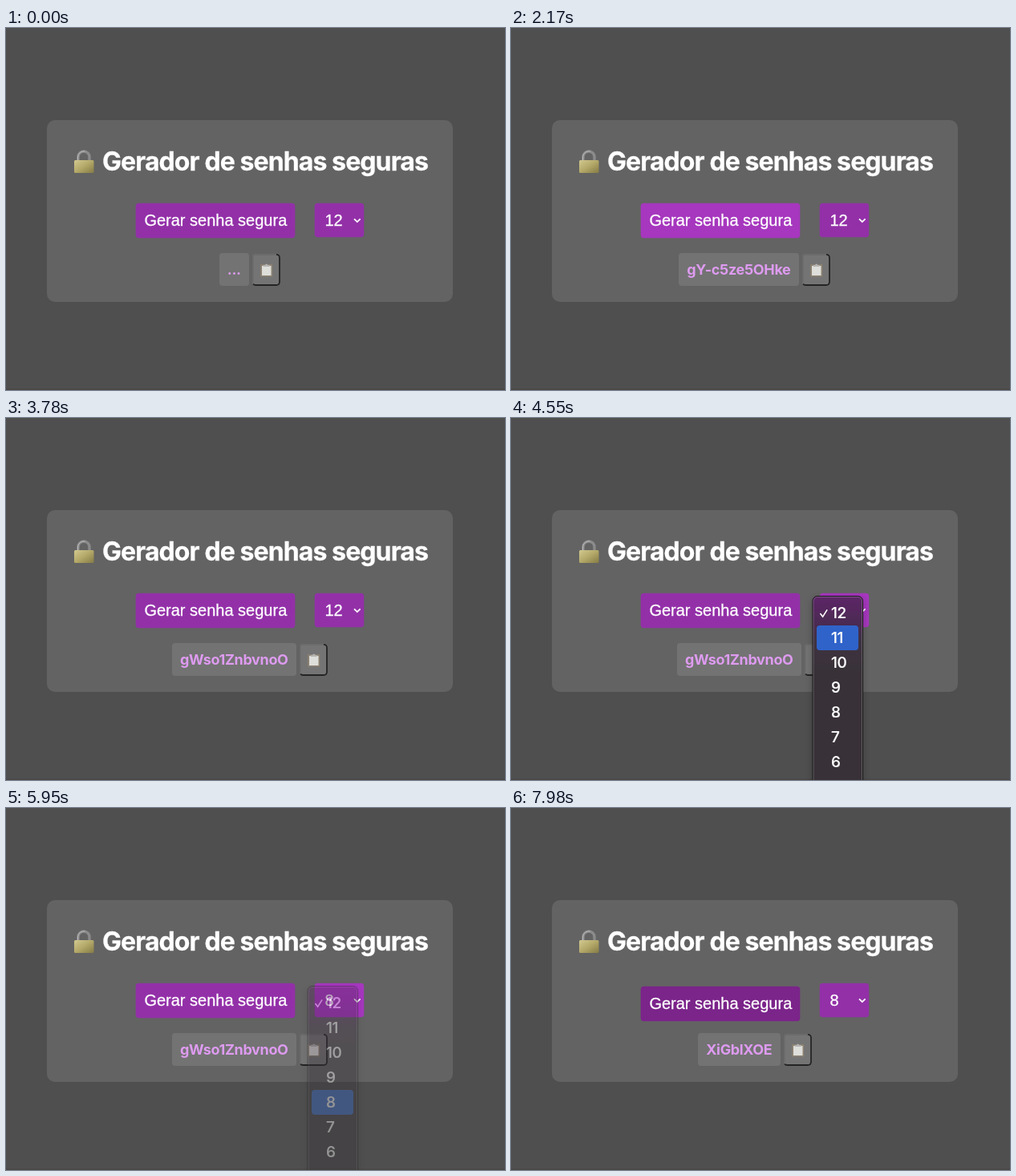
These frames come from a looping animation (622 px wide and 452 px high, 8 s). An HTML page:

```html
<!DOCTYPE html>
<html lang="pt-BR">
<head>
<meta charset="utf-8">
<title>Gerador de senhas</title>
<style>
  html, body { margin: 0; width: 100%; height: 100%; overflow: hidden; background: #4f4f4f; }
  svg { display: block; }
  text { fill: #fff; white-space: pre; }
  .control { font: 20px "Liberation Sans", Arial, sans-serif; stroke: #fff; stroke-width: .3px; }
  .title { font: 700 32px Inter, sans-serif; letter-spacing: -.9px; text-anchor: middle; stroke: #fff; stroke-width: .3px; }
  #password { font: 700 18px Inter, sans-serif; letter-spacing: -.35px; fill: #de9bf0; text-anchor: middle; }
  #rows text { font: 500 19px Inter, sans-serif; letter-spacing: -.3px; stroke: #fff; stroke-width: .2px; }
</style>
</head>
<body>
<svg width="622" height="452" viewBox="0 0 622 452">
  <defs>
    <linearGradient id="brass" x2="1" y2="1">
      <stop stop-color="#d2c990"/><stop offset=".5" stop-color="#b3a868"/><stop offset="1" stop-color="#857b45"/>
    </linearGradient>
    <linearGradient id="glass" gradientUnits="userSpaceOnUse" x1="0" y1="222" x2="0" y2="320">
      <stop stop-color="#5d2568"/><stop offset=".3" stop-color="#4e2a56"/>
      <stop offset=".6" stop-color="#3d3240"/><stop offset="1" stop-color="#383338"/>
    </linearGradient>
    <filter id="shadow" x="-50%" y="-20%" width="200%" height="140%">
      <feDropShadow dx="0" dy="3" stdDeviation="5" flood-opacity=".25"/>
    </filter>
  </defs>

  <rect width="622" height="452" fill="#4f4f4f"/>
  <rect y="450" width="622" height="2" fill="#4b4848"/>
  <rect x="51" y="115" width="506" height="227" rx="10" fill="#636363"/>

  <path d="M90 168v-7a7 7 0 0 1 14 0v7" fill="none" stroke="#8b8b8b" stroke-width="3.4"/>
  <path d="M89.5 166v-5a7.5 7.5 0 0 1 9-7" fill="none" stroke="#bcbcbc"/>
  <rect x="85" y="165" width="24.5" height="16" rx="1.5" fill="url(#brass)"/>
  <text class="title" x="323" y="178">Gerador de senhas seguras</text>

  <g id="generate">
    <rect x="161.7" y="218.7" width="198.6" height="43.5" rx="4"/>
    <text class="control" x="172.4" y="247">Gerar senha segura</text>
  </g>

  <g id="select">
    <g id="ring" fill="none">
      <rect x="383.5" y="217.5" width="64" height="45" rx="5" stroke="#fff"/>
      <rect x="384.5" y="218.5" width="62" height="43" rx="4" stroke="#1a66cc"/>
    </g>
    <rect id="selectBox" x="384.7" y="218.7" width="61.5" height="42.5" rx="4"/>
    <text id="length" class="control" x="397.5" y="247"></text>
    <path d="M434 238.3l3.8 3.8 3.8-3.8" fill="none" stroke="#fff" stroke-width="1.8"/>
  </g>

  <rect id="pill" y="281" height="41" rx="4" fill="#737373"/>
  <text id="password" y="308"></text>

  <g id="copy">
    <rect y="282" width="35" height="40" rx="4" fill="#747474"/>
    <path d="M.8 318V286q0-3 3-3H31" fill="none" stroke="#6a6a6a" stroke-width="1.5"/>
    <path d="M30 282.8q4 0 4 4V317q0 4-4 4H4q-2 0-3-1.5" fill="none" stroke="#242424" stroke-width="1.8"/>
    <rect x="10.2" y="295" width="15" height="15.5" rx="1" fill="#8c8272"/>
    <rect x="12" y="297" width="11.5" height="12" fill="#dededa"/>
    <path d="M13.7 298v-2h2.5a1.5 1.5 0 0 1 3 0h2.5v2z" fill="#b4b4b4"/>
  </g>

  <g id="menu">
    <rect x="376" y="222.5" width="62.5" height="260" rx="6" fill="url(#glass)" stroke="#161216" filter="url(#shadow)"/>
    <rect x="377" y="223.5" width="60.5" height="258" rx="5" fill="none" stroke="#fff" stroke-opacity=".22"/>
    <rect id="highlight" x="381" width="52" height="31" rx="4" fill="#2f63ca"/>
    <path d="M385.8 244.5l2.8 3.6 5.2-8.2" fill="none" stroke="#fff" stroke-width="1.6" stroke-linecap="round"/>
    <g id="rows"></g>
  </g>
</svg>

<script>
const LOOP = 8000, STEP = 70;
const NORMAL = [147, 48, 168], HOVER = [166, 55, 190], ACTIVE = [123, 36, 138];
const $ = id => document.getElementById(id);
const set = (id, attrs) => { for (const k in attrs) $(id).setAttribute(k, attrs[k]); };
const mix = (a, b, k) => `rgb(${a.map((v, i) => Math.round(v + (b[i] - v) * k))})`;
const within = (t, from, to) => t >= from && t < to;
const latest = (list, t) => list.filter(item => item[0] <= t).pop();

// [start, text, pill width]
const passwords = [
  [0, '...', 37], [1680, 'gY-c5ze5OHke', 150], [2380, 'Rk4mTe-sa8Yb', 149],
  [3080, 'xhu2RUblQVxP', 151], [3500, 'gWso1ZnbvnoO', 155],
  [6930, 'n7KhuD2R', 109], [7560, 'XiGblXOE', 103]
];
const releases = [...passwords.slice(1).map(p => p[0]), 8050];
// [start, highlighted row], -1 for none
const highlights = [[0, -1], [4130, 0], [4480, 1], [4620, 2], [4760, 3], [5040, 4], [5600, -1], [5670, 4]];

$('rows').innerHTML = [12, 11, 10, 9, 8, 7, 6]
  .map((n, i) => `<text x="399" y="${250 + 31 * i}">${n}</text>`).join('');

function pressAmount(t) {
  const left = releases.find(r => r > t) - t;
  return left <= STEP ? 1 : left <= 2 * STEP ? .5 : 0;
}

function draw(t) {
  const press = pressAmount(t);
  const hover = within(t, 210, 280) ? .5 : within(t, 280, 3710) || t >= 6440 ? 1 : 0;
  set('generate', {
    transform: `translate(0 ${4 * press})`,
    fill: press ? mix(HOVER, ACTIVE, press) : mix(NORMAL, HOVER, hover)
  });

  set('selectBox', { fill: mix(NORMAL, HOVER, within(t, 3850, 6090) ? 1 : 0) });
  set('ring', { opacity: within(t, 6020, 6720) ? 1 : 0 });
  $('length').textContent = t < 5740 ? '12' : '8';

  const [, text, width] = latest(passwords, t);
  const left = Math.round(304 - (width + 39.5) / 2);
  set('pill', { x: left, width });
  set('password', { x: left + width / 2 - .2 });
  $('password').textContent = text;
  set('copy', { transform: `translate(${left + width + 4} 0)` });

  const row = latest(highlights, t)[1];
  set('highlight', { y: 228 + 31 * row, opacity: row < 0 ? 0 : 1 });
  const fade = Math.min(1, Math.max(0, (6090 - t) / 350));
  set('menu', { opacity: t < 4060 ? 0 : fade });
}

function tick() {
  const t = performance.now() % LOOP;
  draw(Math.floor(t / STEP) * STEP);
  requestAnimationFrame(tick);
}
tick();
</script>
</body>
</html>
```
